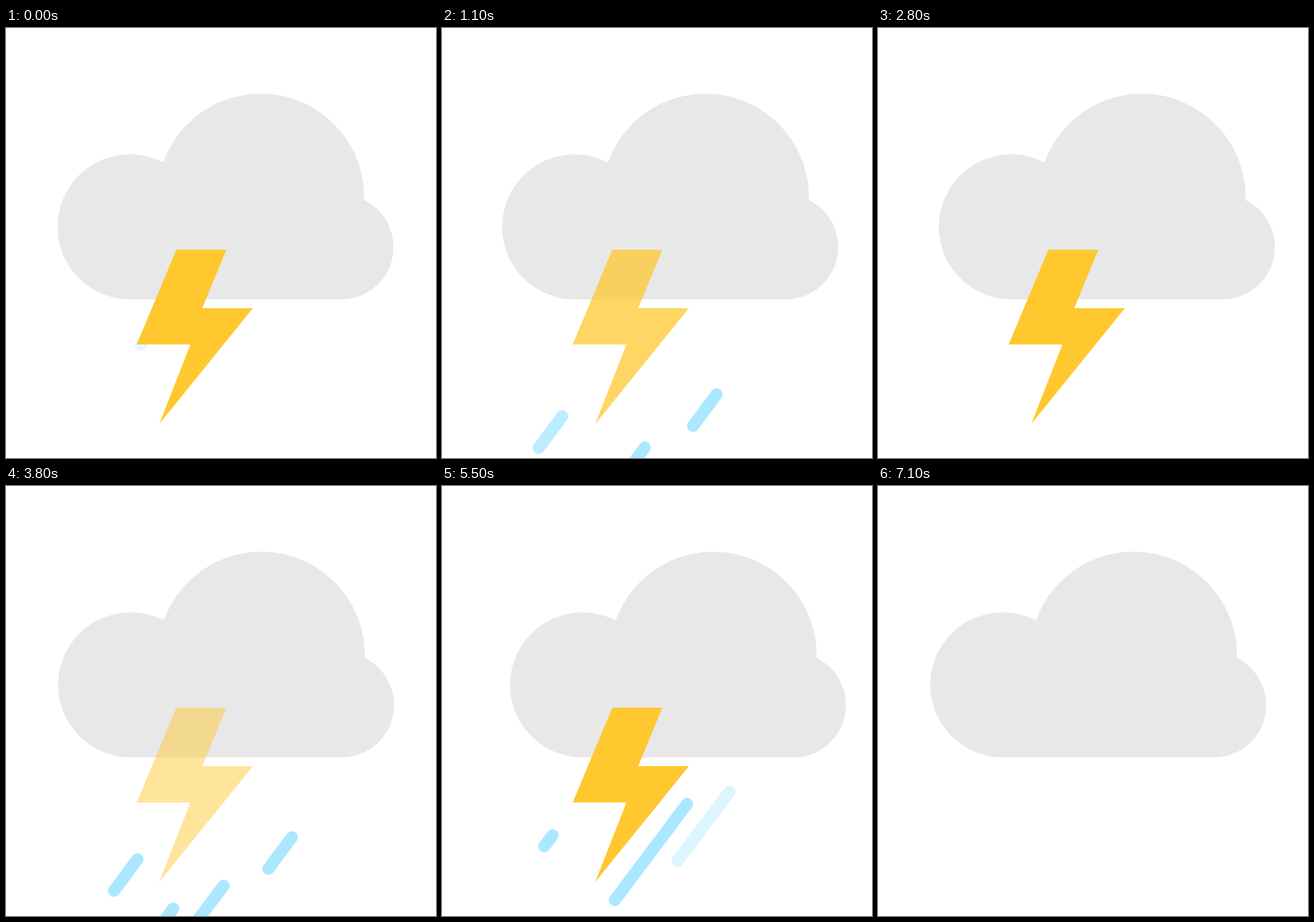
An HTML page without scripts for the animation above (7200 ms loop, 640 by 640 pixels).

```html
<!DOCTYPE html>
<html lang="en">
<head>
<meta charset="utf-8">
<title>Thunderstorm</title>
<style>
  html, body { margin: 0; width: 100%; height: 100%; overflow: hidden; background: #fff; }
  svg { display: block; width: 100%; height: 100%; }

  .cloud { fill: #e8e8e8; animation: drift 3.6s linear infinite; }
  .bolt { fill: #ffc82f; animation: flash 7.2s linear infinite; }

  /* --t: start of the shower, --s: start of the drop within it */
  .rain path {
    fill: none;
    stroke: #abe8ff;
    stroke-width: 18;
    stroke-linecap: round;
    animation: 7.2s linear calc(var(--t) + var(--s) - 7200ms) infinite;
  }
  .rain .a { --s: 0ms; animation-name: fall-a; }
  .rain .b { --s: 280ms; animation-name: fall-b; }
  .rain .c { --s: 330ms; animation-name: fall-c; }
  .rain .d { --s: 500ms; animation-name: fall-d; }
  .rain .e { --s: 660ms; animation-name: fall-e; }

  @keyframes drift {
    0%, 100% { transform: translateX(0); }
    5.56% { transform: translateX(.9px); }
    12% { transform: translateX(3px); }
    19.4% { transform: translateX(6.3px); }
    30.6% { transform: translateX(13px); }
    41.7% { transform: translateX(20.2px); }
    45% { transform: translateX(22.2px); }
    50%, 52.8% { transform: translateX(24.6px); }
    57% { transform: translateX(24px); }
    63.9% { transform: translateX(21.3px); }
    75% { transform: translateX(15.8px); }
    77.8% { transform: translateX(14px); }
    86.1% { transform: translateX(8.2px); }
    93% { transform: translateX(3.2px); }
    97.2% { transform: translateX(1.1px); }
  }

  @keyframes flash {
    0%, 13%, 17%, 51.5%, 56%, 85%, 89%, 95% { opacity: 1; }
    13.9%, 52.78%, 86.3% { opacity: .48; }
    15.28%, 54.2%, 87.5% { opacity: .74; }
    98.5%, 100% { opacity: 0; }
  }

  @keyframes fall-a {
    0% { opacity: .3; transform: none; }
    2%, 10.5% { opacity: 1; }
    12.1%, 100% { opacity: 0; transform: translate(-115px, 154px); }
  }
  @keyframes fall-b {
    0% { opacity: 0; transform: none; }
    1%, 11% { opacity: 1; }
    12.1%, 100% { opacity: 0; transform: translate(-160px, 215px); }
  }
  @keyframes fall-c {
    0% { opacity: 0; transform: none; }
    1.2%, 12% { opacity: 1; }
    9.31% { transform: translate(-111px, 149px); }
    12.8%, 100% { opacity: 0; transform: translate(-164px, 220px); }
  }
  @keyframes fall-d {
    0% { opacity: 0; transform: none; }
    1.4%, 6.95% { opacity: 1; }
    8.33% { opacity: .8; }
    9.24% { opacity: .45; }
    10.42%, 100% { opacity: 0; transform: translate(-120px, 161px); }
  }
  @keyframes fall-e {
    0% { opacity: 0; transform: none; }
    1.4%, 12.8% { opacity: 1; }
    13.06%, 100% { opacity: 0; transform: translate(-150px, 201px); }
  }
</style>
</head>
<body>
<svg viewBox="0 0 640 640">
  <path class="cloud" d="M183 404A108 108 0 1 1 234 200A154 154 0 0 1 533 256A78 78 0 0 1 497 404Z"/>

  <g class="rain" style="--t: 0ms">
    <path class="a" d="M213 455l-12.5 16.5"/>
    <path class="b" d="M380.5 452l-107.5 143"/>
    <path class="c" d="M434 447l-77.5 103"/>
    <path class="d" d="M275 449l-35 47"/>
    <path class="e" d="M479 451l-35 47"/>
  </g>
  <g class="rain" style="--t: 2805ms">
    <path class="a" d="M213 455l-12.5 16.5"/>
    <path class="b" d="M380.5 452l-107.5 143"/>
    <path class="c" d="M434 447l-77.5 103"/>
    <path class="d" d="M275 449l-35 47"/>
    <path class="e" d="M479 451l-35 47"/>
  </g>
  <g class="rain" style="--t: 5135ms">
    <path class="a" d="M213 455l-12.5 16.5"/>
    <path class="b" d="M380.5 452l-107.5 143"/>
    <path class="c" d="M434 447l-77.5 103"/>
    <path class="d" d="M275 449l-35 47"/>
    <path class="e" d="M479 451l-35 47"/>
  </g>

  <path class="bolt" d="M253.500 330H328L292 417H367.500L228 589.500L274.500 471H194.500Z"/>
</svg>
</body>
</html>
```
